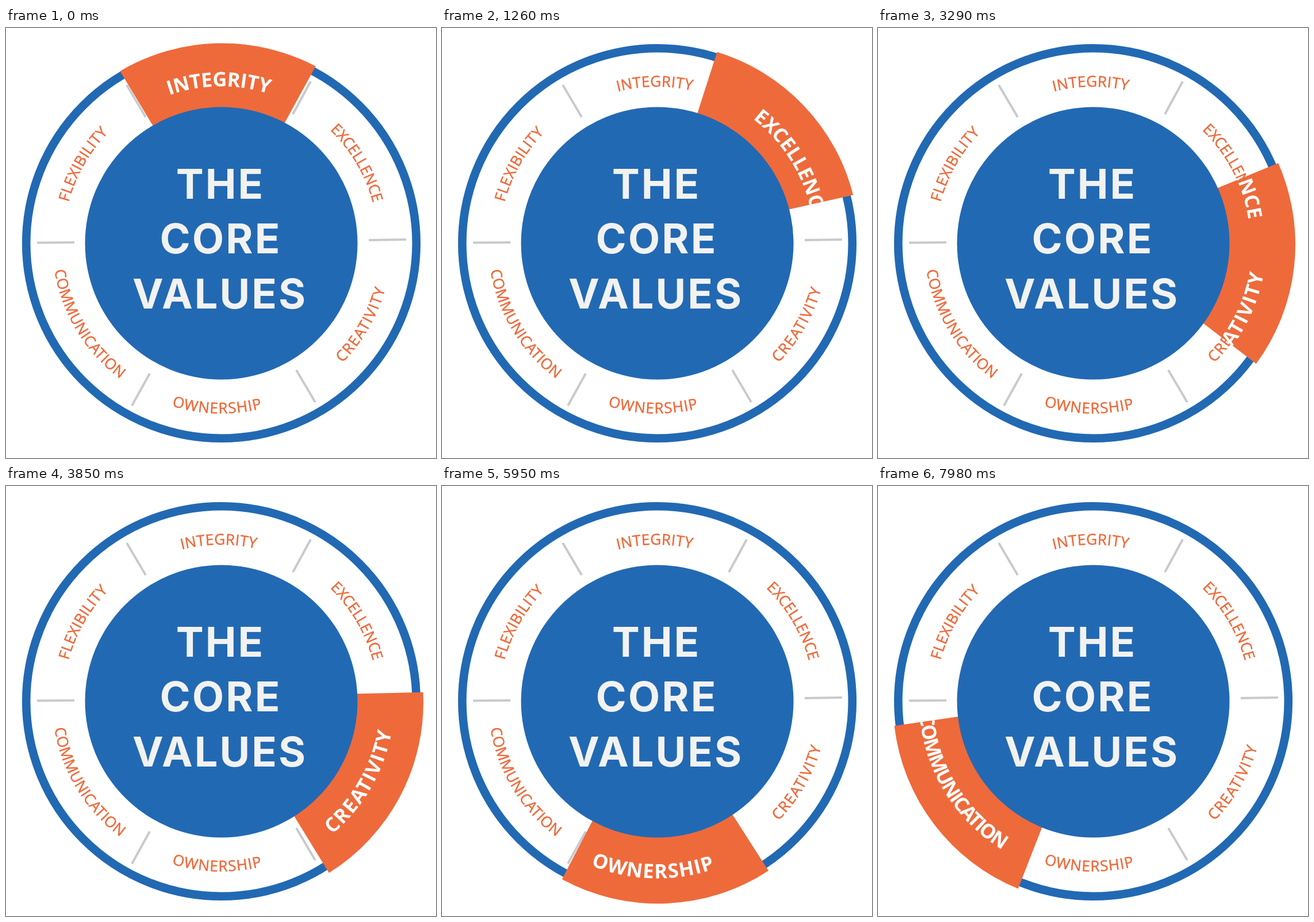
An HTML page that plays this animation: 748x748 px, repeating every 8000 ms.

```html
<!DOCTYPE html>
<html lang="en">
<head>
<meta charset="utf-8">
<title>The core values</title>
<style>
  html, body { margin: 0; width: 100%; height: 100%; overflow: hidden; background: #fff; }
  svg { display: block; width: 100%; height: 100%; }
  .label { font: 400 26px "Open Sans", sans-serif; fill: #ee6a3b; stroke: #ee6a3b; stroke-width: 0.5px; text-anchor: middle; }
  .bold { font-weight: 700; font-size: 34.5px; fill: #fff; stroke: none; }
  .title { font: 700 72px Inter, sans-serif; fill: #f2f2f2; text-anchor: middle; letter-spacing: 3px; }
</style>
</head>
<body>
<svg viewBox="0 0 748 748">
  <defs><clipPath id="clip"><path id="clipShape"/></clipPath></defs>
  <circle cx="374.5" cy="374.5" r="339.3" fill="#fff" stroke="#2269b3" stroke-width="14.6"/>
  <path d="M54 373.5L119 373M631 369L696 368M210 99L243 155M530 93L499 150M505 595L538 651M250 601L219 657"
        stroke="#c9cacd" stroke-width="4"/>
  <g id="plain"></g>
  <path id="wedge" fill="#ee6a3b"/>
  <g id="strong" clip-path="url(#clip)"></g>
  <circle cx="374.5" cy="374.5" r="237" fill="#2269b3"/>
  <g class="title">
    <text x="373" y="297">THE</text>
    <text x="373.5" y="392">CORE</text>
    <text x="372" y="488">VALUES</text>
  </g>
</svg>
<script>
const NS = 'http://www.w3.org/2000/svg';
const $ = id => document.getElementById(id);
const LOOP = 8000, STEP = 70;

// word, angle of its middle, then [radius, letter spacing] plain and bold
const labels = [
  ['INTEGRITY', -0.9, [272.5, 0.4], [273, -0.4]],
  ['EXCELLENCE', 59.4, [273, -0.3], [273, -0.2]],
  ['CREATIVITY', 120, [296, 1.7], [301, 2]],
  ['OWNERSHIP', 181.4, [296, 1.1], [308, 1.4]],
  ['COMMUNICATION', 238.7, [294, 0.4], [303, -2]],
  ['FLEXIBILITY', 299.7, [275, 0.3], [275, 0]]
];

// degrees turned, time of the halfway point, half duration
const turns = [
  [61.4, 1046, 900],
  [58.1, 3210, 880],
  [61.9, 5385, 980],
  [60, 7629, 930]
];

// point at a clockwise angle from the top
function polar(cx, cy, r, deg) {
  const a = deg * Math.PI / 180;
  return (cx + r * Math.sin(a)).toFixed(2) + ' ' + (cy - r * Math.cos(a)).toFixed(2);
}

function addLabel(parent, id, word, angle, [r, spacing], cls) {
  const low = angle > 90 && angle < 270;
  const side = low ? -60 : 60;
  const path = document.createElementNS(NS, 'path');
  path.id = id;
  path.setAttribute('d', `M${polar(374.5, 374.5, r, angle - side)}A${r} ${r} 0 0 ${low ? 0 : 1} ${polar(374.5, 374.5, r, angle + side)}`);
  document.querySelector('defs').append(path);

  const text = document.createElementNS(NS, 'text');
  text.setAttribute('class', cls);
  text.style.letterSpacing = spacing + 'px';
  const run = document.createElementNS(NS, 'textPath');
  run.setAttribute('href', '#' + id);
  run.setAttribute('startOffset', '50%');
  run.textContent = word;
  text.append(run);
  parent.append(text);
}

labels.forEach(([word, angle, plain, bold], i) => {
  addLabel($('plain'), 'p' + i, word, angle, plain, 'label');
  addLabel($('strong'), 's' + i, word, angle, bold, 'label bold');
});

function ease(u) {
  u = Math.min(1, Math.max(0, u));
  return u < 0.5 ? 4 * u ** 3 : 1 - 4 * (1 - u) ** 3;
}

function draw(t) {
  let mid = -1.4;
  for (const [deg, at, half] of turns) mid += deg * ease((t - at) / (2 * half) + 0.5);
  const half = 30 - 0.9 * Math.cos(mid * Math.PI / 180);
  const d = `M374 367L${polar(376, 376.5, 350, mid - half)}A350 350 0 0 1 ${polar(376, 376.5, 350, mid + half)}Z`;
  $('wedge').setAttribute('d', d);
  $('clipShape').setAttribute('d', d);
}

const start = performance.now();
function tick() {
  const t = (performance.now() - start) % LOOP;
  draw(Math.floor(t / STEP) * STEP);
  requestAnimationFrame(tick);
}
tick();
</script>
</body>
</html>
```
